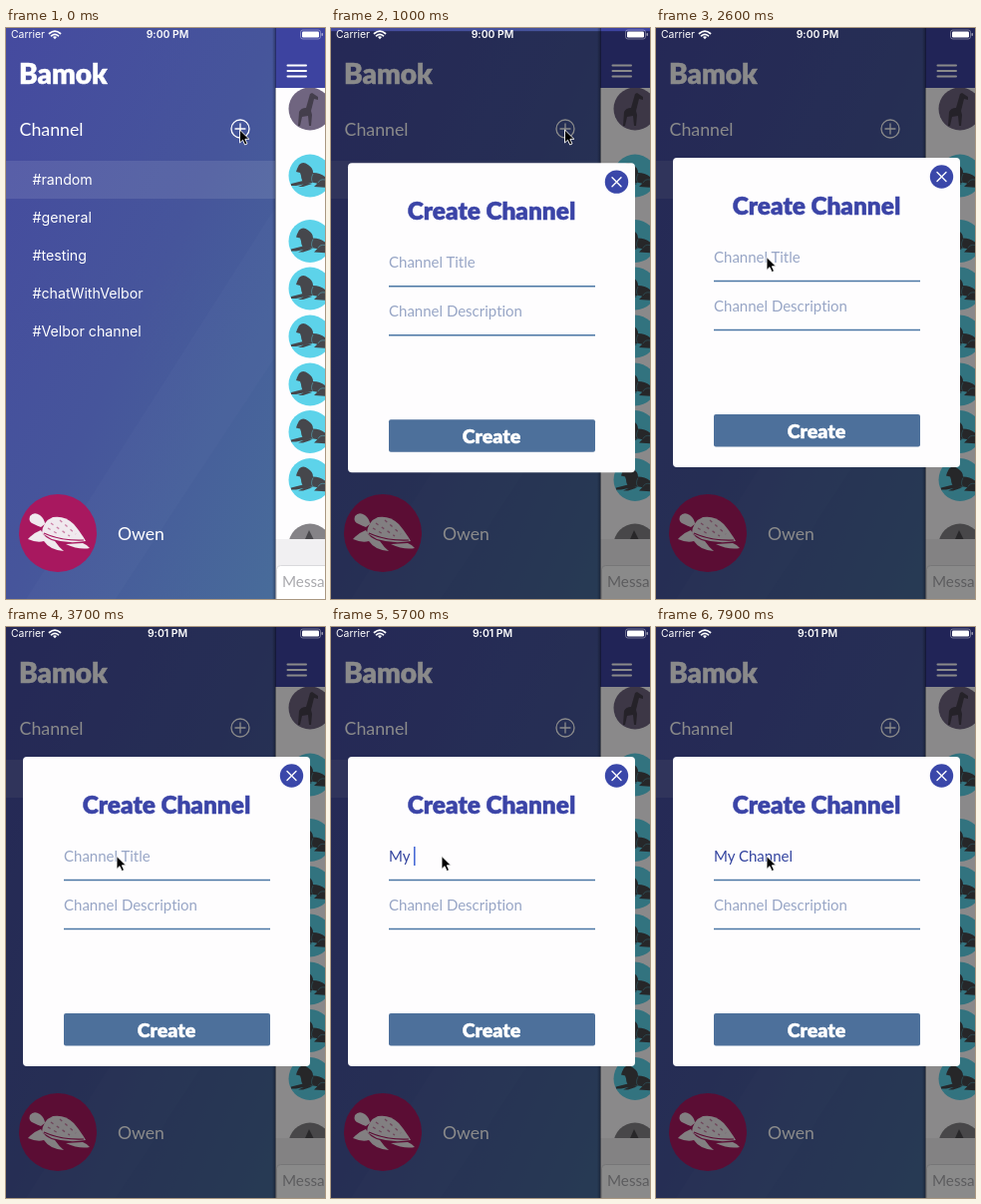
Recreate the animation shown at these times as an HTML page. Size 320 px wide and 572 px high, loop 8 s.

```html
<!DOCTYPE html>
<html lang="en">
<head>
<meta charset="utf-8">
<title>Create Channel</title>
<style>
  html, body { margin: 0; width: 100%; height: 100%; overflow: hidden; background: #fff; }
  svg { display: block; width: 100vw; height: 100vh; }
  text { font-family: Lato, sans-serif; font-variant-ligatures: none; white-space: pre; }
  .bold { font-weight: 900; stroke-width: .5; }
  .status, .rooms { font-family: Inter, Roboto, sans-serif; fill: #fff; }
  .status { font-size: 10.4px; }
  .rooms { font-size: 14.2px; }
  .rooms text, .status text { font-family: inherit; }
  .field { font-size: 15px; }
  .line { fill: none; stroke: #fff; stroke-linecap: round; }
</style>
</head>
<body>
<svg viewBox="0 0 320 572" preserveAspectRatio="none">
  <defs>
    <linearGradient id="menuFill" x1="0" y1="0" x2="1" y2="1">
      <stop offset="0" stop-color="#454a9f"/>
      <stop offset=".5" stop-color="#46559b"/>
      <stop offset="1" stop-color="#486c9a"/>
    </linearGradient>
    <linearGradient id="edge">
      <stop offset="0" stop-color="#101830" stop-opacity="0"/>
      <stop offset="1" stop-color="#101830" stop-opacity=".55"/>
    </linearGradient>
    <clipPath id="chatArea"><rect x="271" y="60" width="49" height="452"/></clipPath>
    <g id="lion">
      <circle r="21.5" fill="#5dd3ea"/>
      <g fill="#46474c">
        <path d="M-13-7L-11-11Q-7-15-2-11Q3-8 3-3Q10-3 15 1Q20 5 18 10L10 10Q8 7 3 7L-5 8Q-9 5-9 0L-10-3L-14-4Z"/>
        <path d="M-7 5L-19 8V10H-14L-4 8ZM-3 7L-12 11H-7L2 8ZM8 7L20 10L19 12L4 11Z"/>
      </g>
      <path d="M3-2Q0 4 3 7M8 7Q10 3 15 4" fill="none" stroke="#5dd3ea" stroke-width=".7" opacity=".6"/>
    </g>
  </defs>

  <!-- chat behind the menu -->
  <rect x="270" width="50" height="572" fill="#fefdfe"/>
  <rect x="270" width="50" height="60" fill="#3d43a0"/>
  <path class="line" stroke-width="2" d="M282.500 37.500H301M282.500 43H301M282.500 48.500H301"/>
  <g clip-path="url(#chatArea)">
    <circle cx="305" cy="81" r="21.500" fill="#706580"/>
    <path fill="#443e4c" d="M313 69L307 65L305 66L301 80Q296 80 294 84L293 98H295L297 89L303 88L304 98H306L307 87L306 83L309 71L313 72Z"/>
    <g id="lions"></g>
    <circle cx="305" cy="518" r="21.500" fill="#858387"/>
    <path d="M304 503L312 519H297Z" fill="#49484c"/>
  </g>
  <rect x="270" y="512" width="50" height="60" fill="#f1f0f2"/>
  <rect x="271.500" y="538.500" width="60" height="40" rx="4" fill="#fff" stroke="#d9d9dc"/>
  <text x="277" y="560" font-size="15.200" fill="#a9a9ad">Message</text>

  <!-- menu -->
  <rect width="270" height="572" fill="url(#menuFill)"/>
  <path d="M270 180L20 572H110L270 330Z" fill="#fff" opacity=".015"/>
  <rect x="267" width="4" height="572" fill="url(#edge)"/>
  <text class="bold" x="13" y="55.500" font-size="28" fill="#fff" stroke="#fff">Bamok</text>
  <text x="13.500" y="108" font-size="17.800" fill="#fff">Channel</text>
  <circle class="line" cx="235" cy="101" r="9" stroke-width="1.300"/>
  <path class="line" stroke-width="1.300" d="M230 101H240M235 96V106"/>
  <rect y="133" width="270" height="38" fill="#fff" opacity=".1"/>
  <g id="rooms" class="rooms"></g>
  <circle cx="52" cy="506" r="39" fill="#a8185f"/>
  <g fill="#f0e9ee">
    <path d="M36 506Q37 494 47 490Q59 488 68 497Q75 505 80 514Q62 517 46 512Z"/>
    <path d="M35 500Q32 499 28 497Q22 495 24 489Q28 484 34 488Q39 492 39 497Z"/>
    <path d="M35 503Q38 511 49 514Q53 520 58 524Q44 523 38 514Q31 516 22 512Q27 506 35 503Z"/>
    <path d="M60 517L77 516Q82 518 84 521Q73 523 60 517Z"/>
  </g>
  <path d="M38 506Q55 514 78 513" fill="none" stroke="#a8185f" stroke-width="1.200"/>
  <path d="M45 496L64 509M54 493L70 507M42 501L54 508" fill="none" stroke="#a8185f" stroke-width="1.300" stroke-dasharray="3 4" opacity=".5"/>
  <text x="112" y="513" font-size="17.600" fill="#fff">Owen</text>

  <!-- dialog with its dimming layer -->
  <g id="sheet">
    <rect y="-2" width="320" height="582" fill="#000" opacity=".46"/>
    <rect x="17" y="130" width="288" height="310" rx="4" fill="#fefdfe"/>
    <circle cx="286.500" cy="149" r="11.700" fill="#3a47a9"/>
    <path class="line" stroke-width="1.400" d="M282 144.500L291 153.500M291 144.500L282 153.500"/>
    <text class="bold" x="161" y="187" font-size="24.400" text-anchor="middle" fill="#3b44a7" stroke="#3b44a7">Create Channel</text>
    <text id="title" class="field" x="58" y="234.500"></text>
    <rect id="caret" y="220" width="1.600" height="19" fill="#4769d6"/>
    <text class="field" x="58" y="283.500" fill="#98a6c6">Channel Description</text>
    <path d="M58 253.500H265M58 302.500H265" stroke="#4b77a5" stroke-width="1.500"/>
    <rect x="58" y="387" width="207" height="32.500" rx="2" fill="#4d709b"/>
    <text class="bold" x="161" y="410.500" font-size="19.500" text-anchor="middle" fill="#fff" stroke="#fff">Create</text>
  </g>

  <!-- status bar -->
  <g class="status">
    <text x="5" y="10.300">Carrier</text>
    <text id="clock" x="162" y="10.300" text-anchor="middle" font-weight="600"></text>
    <path class="line" stroke-width="1.700" stroke-linecap="butt" d="M43.500 5.500Q49 .8 54.500 5.500M45.500 7.800Q49 5 52.500 7.800"/>
    <path d="M47 9Q49 7.600 51 9L49 11.200Z"/>
    <rect x="295.500" y="2" width="20" height="9" rx="2.300" fill="none" stroke="#fff" stroke-width=".7" opacity=".5"/>
    <rect x="297" y="3.500" width="17" height="6" rx="1.200"/>
    <rect x="316.500" y="5" width="1.400" height="3" rx=".7" opacity=".6"/>
  </g>

  <path id="pointer" d="M0 0V13L3 10.200L5.200 15L7.500 14L5.400 9.300H9.400Z" fill="#000" stroke="#fff" stroke-width=".9"/>
</svg>

<script>
  const LOOP = 8000, STEP = 100;
  const $ = id => document.getElementById(id);

  $("lions").innerHTML = [148, 213.5, 261, 309, 357, 404.5, 452.5]
    .map(y => `<use href="#lion" x="305" y="${y}"/>`).join("");
  $("rooms").innerHTML = ["random", "general", "testing", "chatWithVelbor", "Velbor channel"]
    .map((name, i) => `<text x="26.5" y="${157.3 + i * 37.8}">#${name}</text>`).join("");

  const typed = "My Channel";
  const keyTimes = [5300, 5500, 5700, 6000, 6200, 6300, 6500, 6700, 6900, 7000];
  const focusAt = 5000;

  // Critically damped spring, from one screen height down to zero.
  function sheetOffset(t) {
    const x = Math.max(0, t - 611.5) / 1000 * 17.4;
    const y = 572 * (1 + x) * Math.exp(-x);
    return y < 0.4 ? 0 : y;
  }

  function pointerAt(t) {
    const p = Math.min(1, Math.max(0, (t - 1500) / 700));
    const e = p * p * (3 - 2 * p);
    return [234.5 - 123.5 * e, 102 + 127.5 * e];
  }

  function caretShown(t, lastKey) {
    return t >= focusAt && (t - lastKey) % 1000 < 500;
  }

  function render(t) {
    const offset = sheetOffset(t);
    $("sheet").setAttribute("transform", `translate(0 ${offset})`);
    $("sheet").setAttribute("visibility", offset < 572 ? "visible" : "hidden");
    $("pointer").setAttribute("transform", `translate(${pointerAt(t)})`);
    $("clock").textContent = t < 3700 ? "9:00 PM" : "9:01 PM";

    const count = keyTimes.filter(k => k <= t).length;
    const title = $("title");
    title.textContent = count ? typed.slice(0, count) : "Channel Title";
    title.setAttribute("fill", count ? "#3445a0" : "#98a6c6");
    const width = count ? title.getComputedTextLength() : 0;
    $("caret").setAttribute("x", 58 + width);
    const lastKey = count ? keyTimes[count - 1] : focusAt;
    $("caret").setAttribute("visibility", caretShown(t, lastKey) ? "visible" : "hidden");
  }

  const start = performance.now();
  function tick() {
    const t = (performance.now() - start) % LOOP;
    render(Math.floor(t / STEP) * STEP);
    requestAnimationFrame(tick);
  }
  tick();
</script>
</body>
</html>
```
